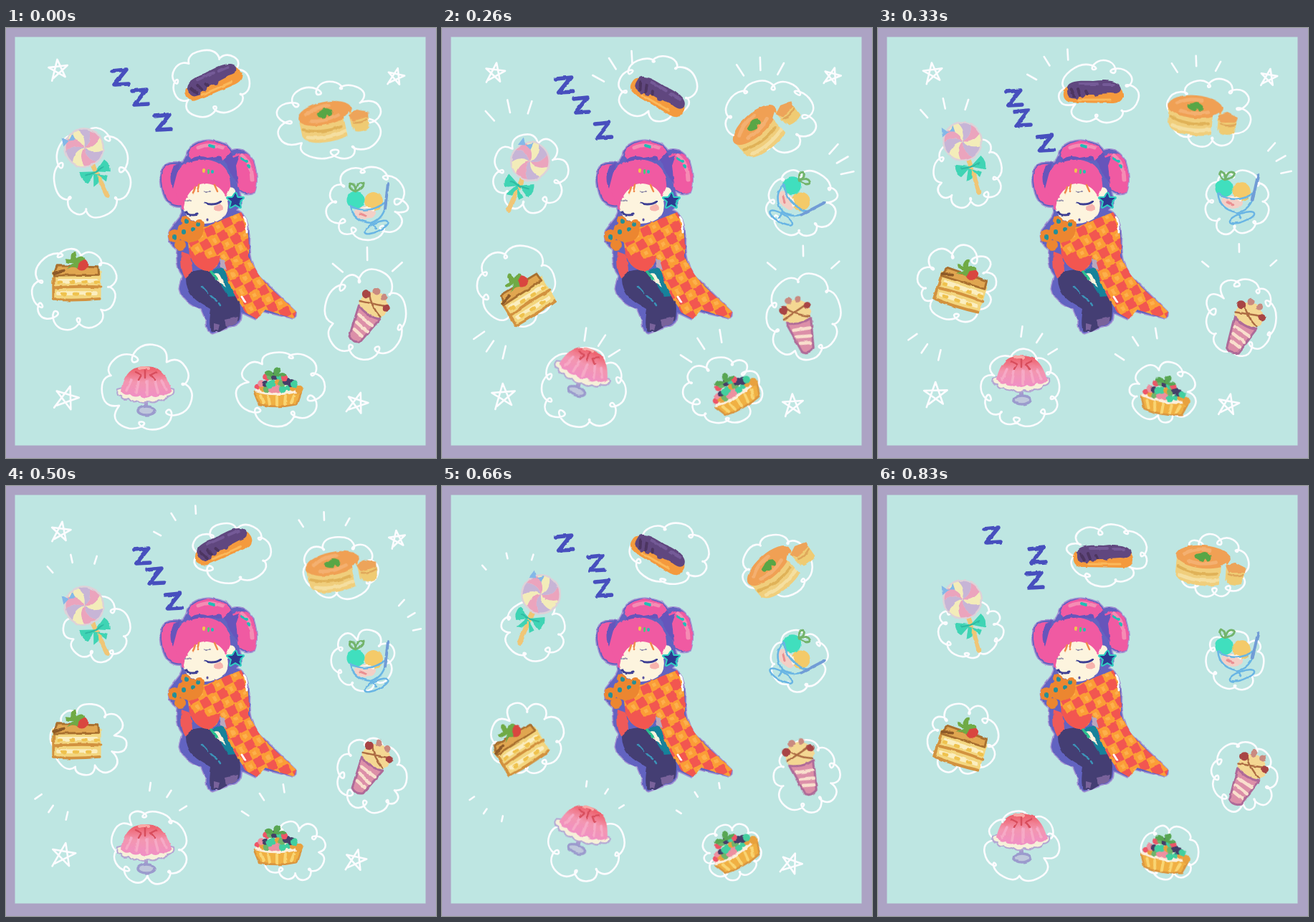
Animation, 600 px wide and 600 px high, one loop 1000 ms. Source, as an HTML page:

```html
<!DOCTYPE html>
<html lang="en">
<head>
<meta charset="utf-8">
<title>Sweet dreams</title>
<style>
html, body { margin: 0; width: 100%; height: 100%; overflow: hidden; background: #aca3c4; }
svg { display: block; width: 100%; height: 100%; }
path, line { stroke-linecap: round; stroke-linejoin: round; }
.line { fill: none; stroke: #fdfcff; stroke-width: 2.6; }
.zzz { fill: none; stroke: #474fbe; stroke-width: 5.5; }
.pose { visibility: hidden; animation: long 1s step-end infinite; }
.pose.brief { animation-name: brief; }
@keyframes long { 0% { visibility: visible } 17%, 100% { visibility: hidden } }
@keyframes brief { 0% { visibility: visible } 16%, 100% { visibility: hidden } }
</style>
</head>
<body>
<svg viewBox="0 0 600 600" fill="none">
<defs>
  <filter id="brush" filterUnits="userSpaceOnUse" x="0" y="0" width="600" height="600" color-interpolation-filters="sRGB">
    <feTurbulence type="fractalNoise" baseFrequency=".08" numOctaves="2" seed="4"/>
    <feDisplacementMap in="SourceGraphic" scale="3.5" xChannelSelector="R" yChannelSelector="G"/>
  </filter>
  <linearGradient id="pink" x2="0" y2="1">
    <stop offset=".1" stop-color="#ee6470"/><stop offset=".5" stop-color="#f396b0"/><stop offset="1" stop-color="#f08fc6"/>
  </linearGradient>
  <pattern id="checks" width="27" height="27" patternUnits="userSpaceOnUse" patternTransform="translate(311 262) rotate(62)">
    <path fill="#fb9d36" d="M0 0H27V27H0Z"/>
    <path fill="#f25650" d="M0 0H13V13H0ZM14 14H27V27H14Z"/>
    <path fill="#fdb04c" d="M17 4H24V9H17ZM4 18H9V23H4Z"/>
  </pattern>

  <g id="eclair">
    <path fill="#f49a3d" d="M-41 0Q-43 15-27 15L28 16Q43 15 42 3 41-9 28-9L-30-9Q-40-8-41 0Z"/>
    <path stroke="#fbb95c" stroke-width="3" d="M-20 11H24"/>
    <path fill="#60477f" d="M-36-4C-37-15-20-16 0-15 20-18 39-15 39-4Q38 4 24 2L8 3Q4 10 0 4L-10 4Q-14 11-18 5L-22 10-29 9Q-37 8-36-4Z"/>
    <path stroke="#4c3560" stroke-width="4" d="M-31-4L-26 6M-21-4l3 8M-10-1l2 4"/>
    <path stroke="#745a97" stroke-width="4" d="M-18-11H6M14-10H29"/>
  </g>

  <g id="pancake">
    <path fill="#f0ce7c" d="M-37-12V13Q-33 27 0 28T36 12V-12Z"/>
    <path stroke="#e0b258" stroke-width="4" d="M-34 4Q-8 16 20 10"/>
    <path stroke="#f5dfa0" stroke-width="5" d="M-30 16Q-4 25 28 17"/>
    <ellipse cy="-12" rx="38" ry="16" fill="#f0a054"/>
    <path stroke="#f4b070" stroke-width="5" d="M-26-15Q-12-24 8-22M-20-5Q0 0 18-6"/>
    <path fill="#58a646" d="M0-6Q-14-8-11-15L-4-17Q2-22 10-15 12-6 6-6L3-10Z"/>
    <path fill="#bee6e2" d="M25-2L33-7 33 24 25 26Z"/>
    <path fill="#eda45a" d="M32-3L45-8 60-2 58 8 38 10Z"/>
    <path fill="#efcb73" d="M34 7L59 5 57 21Q46 25 36 21Z"/>
    <path stroke="#dfa75a" stroke-width="2.5" d="M37 9Q46 12 57 8"/>
  </g>

  <g id="lolly">
    <line y1="20" y2="74" stroke="#f0c676" stroke-width="6.5"/>
    <circle r="28" fill="#ddd2d8"/>
    <g id="swirl" opacity=".85"></g>
    <path fill="#84b8e8" d="M-15-18L-22-27-25-14ZL-6-25-6-15Z"/>
    <path fill="#3fd4b4" d="M0 37L-20 28Q-24 40-17 47ZL18 27Q24 37 18 47ZM-4 38L-12 55-4 53 0 42 7 56 12 50Z"/>
    <path stroke="#2fb9a3" stroke-width="2" d="M-14 36L0 38 13 36"/>
  </g>

  <g id="sundae">
    <ellipse cx="-1" cy="8" rx="15" ry="9" fill="#f3cfc6"/>
    <circle cx="11" cy="-8" r="13" fill="#f4ca69"/>
    <circle cx="-14" cy="-10" r="12.5" fill="#40dfbe"/>
    <path stroke="#73b46c" stroke-width="3" d="M-14-22Q-26-26-21-33-14-32-14-22Q-12-36-3-33-2-26-14-22"/>
    <path stroke="#fff4e4" stroke-width="4" d="M-6 3Q4 0 10 4"/>
    <path stroke="#ea8f92" stroke-width="3" d="M-8 9l8 3"/>
    <path stroke="#69b5e4" stroke-width="2.5" d="M-22-2Q-18 20 8 22 26 16 29-8M-22-2Q4 12 29-8M9 22L14 30"/>
    <ellipse cx="15" cy="28" rx="18" ry="6" transform="rotate(-25 15 28)" stroke="#69b5e4" stroke-width="2.5"/>
    <path stroke="#719cd6" stroke-width="4" d="M31-33L27 2"/>
  </g>

  <g id="crepe">
    <path fill="#f4d792" d="M-20-12Q-22-34 0-37 20-34 20-14L8 0-12 2Z"/>
    <path fill="#dc8fa8" stroke="#ae6a98" stroke-width="3" d="M-18-8Q0 0 17-6L9 35Q0 42-8 36Z"/>
    <path stroke="#f9dfcd" stroke-width="4.5" d="M-11 4L12 7M-9 14L10 18M-7 24L7 27"/>
    <path stroke="#ad6c43" stroke-width="2.5" d="M-20-14L16-26M-14-30Q-4-16 16-9"/>
    <g fill="#a84545"><circle cx="-17" cy="-27" r="6"/><circle cx="17" cy="-24" r="5"/></g>
    <g fill="#c98a80"><circle cx="-7" cy="-37" r="5"/><circle cx="7" cy="-36" r="4.5"/></g>
  </g>

  <g id="tart">
    <path fill="#f0b043" stroke="#d9953f" stroke-width="2.5" d="M-33 6H33L27 23Q0 29-26 23Z"/>
    <path stroke="#f9d573" stroke-width="4" d="M-24 11l4 10M-13 12l2 11M-1 12V24M11 12l-1 11M23 11l-4 10"/>
    <path fill="#fcefdc" d="M-33 6Q-24-12 0-12T33 5Q0 15-33 6Z"/>
    <g id="fruit"></g>
    <path fill="#58a653" d="M-5-17Q-19-15-18-22-10-28-5-18-8-29 2-29 8-23-1-18 8-24 12-18 6-13-5-17Z"/>
  </g>

  <g id="jelly">
    <path stroke="#a59bce" stroke-width="6" d="M0 16V30"/>
    <ellipse cx="1" cy="29" rx="12" ry="6" stroke="#9b9bcd" stroke-width="3.5" fill="#bfc8dc"/>
    <path fill="#f6f0d9" stroke="#b4a6d3" stroke-width="2" d="M-40-1Q-43 8-34 8-32 15-24 12-19 19-11 15-4 21 4 16 12 20 18 14 27 16 30 9 41 8 39-1 0-14-40-1Z"/>
    <path fill="url(#pink)" d="M-35 1Q-30-23-16-30 0-36 16-30 30-22 36 1 30 9 22 6 14 13 8 8 0 14-8 8-16 12-22 6-30 9-35 1Z"/>
    <path stroke="#f6aac6" stroke-width="3.5" d="M-20-14L-27 1M-10-12L-13 5M2-12V7M13-12L17 4M22-13L28 0"/>
    <path stroke="#d84d5c" stroke-width="2.5" d="M-14-25L-6-21-10-14M0-28V-17M14-25L6-21 12-14"/>
    <path stroke="#f9a9a6" stroke-width="4" d="M-9-30Q-2-32 4-30"/>
  </g>

  <g id="cake" transform="scale(.96)">
    <path fill="#f3d67f" d="M-35-12H36V30H-35Z"/>
    <path stroke="#fbeec0" stroke-width="6" d="M-25 3H30M-25 21H28"/>
    <path stroke="#efc24e" stroke-width="5" stroke-dasharray="4 14" d="M-26 5H32M-20 22H30"/>
    <path stroke="#d2923f" stroke-width="4" d="M-32 13Q0 10 36 12M-33 30Q0 32 34 29M-33-2V28"/>
    <path fill="#e0a650" stroke="#a9702f" stroke-width="3" d="M-28-19L32-18 33-6-33-5Z"/>
    <path stroke="#8d5a28" stroke-width="4" d="M-33-8L-18-12"/>
    <circle cx="8" cy="-21" r="9" fill="#d9463f"/>
    <path fill="#70aa45" d="M-4-23Q-18-22-16-29L-8-28Q-8-40-1-40L1-30Q10-36 13-29L4-24 2-15-5-18-14-14Z"/>
  </g>
</defs>

<path fill="#bee6e2" d="M12.5 12.5H585.5V582.5H12.5Z"/>

<g id="girl" filter="url(#brush)">
  <path fill="#6263c1" stroke="#a594d3" stroke-width="1.5" d="M217 198Q222 184 246 187Q252 180 252 173Q260 156 284 156Q308 158 315 170Q334 164 346 186Q354 212 347 230Q336 236 326 229Q334 244 322 254Q336 256 341 290Q338 320 352 344L405 396Q406 406 400 406L358 396 348 407 329 398Q330 412 318 416L288 427Q278 424 279 410L272 393Q246 384 242 364L246 346Q236 334 238 310Q222 298 228 282L242 264Q246 258 245 250Q226 252 219 232Q213 212 217 198Z"/>
  <g fill="#f05aa2">
    <path d="M219 198Q226 187 240 191Q236 216 246 247Q228 250 221 230 216 212 219 198Z"/>
    <path d="M235 214Q240 184 273 183 304 184 312 208L315 238 304 238 248 254Q238 240 235 214Z"/>
    <path d="M254 179Q255 162 282 157 308 160 315 175L302 185Q276 178 258 183Z"/>
    <path d="M315 180Q334 166 344 184 354 212 347 229 336 234 326 226 319 210 315 180Z"/>
  </g>
  <path stroke="#f58cb4" stroke-width="5" d="M268 167Q284 160 302 167M329 177Q343 188 344 212"/>
  <path fill="#6655bb" d="M255 184Q266 176 282 181L300 178 302 185Q276 181 258 187ZM233 192L243 189 238 205 233 224Q226 210 233 192ZM304 184L314 173 318 181 326 178 321 192 324 218 314 204Z"/>
  <path stroke="#20bfb6" stroke-width="4" d="M284 164l7 2M329 182l7 4M288 200v1M338 192l2 2"/>
  <path stroke="#f4c64a" stroke-width="4" d="M276 198v2"/><path stroke="#4fc67a" stroke-width="4" d="M282 199v3"/>
  <path fill="#fdf4de" d="M248 250Q252 222 280 217 300 219 307 236L313 222Q322 224 318 236L309 241Q312 254 304 263 290 276 268 272 250 266 248 250Z"/>
  <path stroke="#f08a4c" stroke-width="2.5" d="M264 222L261 231M270 219L268 228M291 219L295 228"/>
  <path stroke="#9a95ad" stroke-width="2" d="M250 242l8-2M277 228l8 0"/>
  <path stroke="#3d3f93" stroke-width="3" d="M251 257Q258 263 267 260M278 244Q288 249 299 242"/>
  <path stroke="#5a53a0" stroke-width="3" d="M282 267v1"/>
  <ellipse cx="297" cy="251" rx="7" ry="4.5" fill="#f7b3ad"/>
  <path fill="#2b3a90" stroke="#2fd0c2" stroke-width="4" paint-order="stroke" d="M320 231l3 6 8 0-6 5 2 8-7-4-7 4 2-8-6-5 8 0Z"/>

  <path fill="#ef5a59" d="M245 312L256 316Q262 336 259 348L250 349Q242 336 245 312Z"/>
  <path fill="#443e73" d="M251 350Q258 334 286 338L300 352 322 374Q330 388 325 408L298 424 287 424Q282 418 286 392L266 380Q252 370 251 350Z"/>
  <path fill="#16829a" d="M288 340L306 332 322 374 310 375Z"/>
  <path fill="#fcf3dd" d="M289 342L298 344 307 362 294 353Z"/>
  <path stroke="#2cbf8f" stroke-width="4" d="M285 338L295 351"/>
  <path stroke="#3c93b8" stroke-width="2.5" d="M273 360L282 370M286 374l8 7M297 384l2 3"/>
  <path fill="#79629b" d="M306 406l18-4-2 10-14 6zM290 412l8 2-2 8-6 0z"/>

  <path fill="url(#checks)" d="M254 294Q258 278 280 277L300 268 328 257Q340 276 339 318 350 344 368 362L405 396 402 406 362 393 350 406 334 397Q312 366 302 330L299 320Q296 340 280 339 254 334 254 294Z"/>
  <path fill="#f25650" d="M255 313Q276 326 299 317 296 340 280 339 262 336 255 313Z"/>
  <path fill="#b9a7bd" d="M298 322l6 2 4 14-8-4z"/>
  <path stroke="#fff" stroke-width="3" d="M332 264Q337 272 336 285M329 375l5 8"/>

  <g fill="#ec8630">
    <ellipse cx="257" cy="284" rx="18" ry="15"/><circle cx="251" cy="269" r="7"/><circle cx="270" cy="274" r="7"/>
    <circle cx="235" cy="290" r="9"/><circle cx="243" cy="303" r="8"/>
  </g>
  <path stroke="#238f98" stroke-width="6" d="M252 269v1M235 291v1M261 281v0M248 284v1M268 274v0"/>
</g>
<g id="dreams"></g>
</svg>

<script>
const TAU = 2 * Math.PI, starts = [0, 160, 330, 500, 660, 830];

// from, to: cloud centre and size, first and last
// rock: x, y, turn of the three food poses; drift, hop: offsets in the second swing and at its middle
// fan: rays as x, y, radius, aim, spread, first and last pose
const dreams = [
  { id: 'eclair', from: [286,78,113,93], to: [320,96,114,88], rock: [[288,75,-24],[302,94,30],[300,89,0]],
    drift: [14,9], hop: [-14,-9], fan: [268,98,57,238,29,1,3] },
  { id: 'pancake', from: [452,130,150,114], to: [468,112,102,90], rock: [[447,131,-12],[444,144,-42],[442,122,5]],
    drift: [11,-11], hop: [9,-13], fan: [446,105,55,268,31,1,3] },
  { id: 'sundae', from: [504,245,115,106], to: [498,243,84,86], rock: [[502,250,0],[488,237,56],[496,235,6]],
    fan: [505,215,62,330,18,1,3] },
  { id: 'crepe', from: [502,401,118,132], to: [510,405,96,102], rock: [[504,403,30],[500,415,-16],[510,418,27]],
    drift: [4,-9], hop: [0,-13], fan: [505,370,55,269,49,0,2] },
  { id: 'tart', from: [383,502,127,106], to: [406,511,84,80], rock: [[379,502,0],[407,507,-30],[401,513,10]],
    fan: [400,500,71,237,24,1,4] },
  { id: 'jelly', from: [196,503,130,120], to: [200,503,108,103], rock: [[195,505,0],[197,479,20],[200,490,0]],
    fan: [192,484,57,303,25,1,4] },
  { id: 'cake', from: [95,364,124,118], to: [119,353,104,102], rock: [[98,350,0],[115,374,-32],[117,360,18]],
    hop: [-9,-11], fan: [100,395,59,124,21,1,4] },
  { id: 'lolly', from: [120,204,112,130], to: [129,200,92,86], rock: [[109,167,-26],[123,186,24],[118,158,-18]],
    hop: [15,-35], fan: [105,165,57,258,30,1,4] }
];
// x, y, radius, last pose
const stars = [[75,60,14,3], [544,70,12,3], [82,514,17,3], [488,526,15,4]];
// x, y, sway, drift
const snores = [[176,85,17,0], [187,113,0,7], [227,148,8,0]];

const random = seed => () => (seed = seed * 16807 % 2147483647) / 2147483647;
const stroke = (d, name = 'line') => `<path class="${name}" d="${d}"/>`;
const point = (x, y) => x.toFixed(1) + ' ' + y.toFixed(1);
const polar = (x, y, r, deg) => point(x + r * Math.cos(deg * TAU / 360), y + r * Math.sin(deg * TAU / 360));

// Scalloped outline whose dips curl back into small loops.
function cloud({ from, to }, k, rand) {
  const ease = 1 - (1 - k / 5) ** 2;
  const [cx, cy, w, h] = from.map((v, i) => v + (to[i] - v) * ease);
  const n = 7 + Math.floor(rand() * 3), step = TAU / n, phase = rand() * step;
  const at = (a, r, slide = 0) => point(
    cx + w / 2 * (r * Math.cos(a) - slide * Math.sin(a)),
    cy + h / 2 * (r * Math.sin(a) + slide * Math.cos(a)));
  const dips = Array.from({ length: n }, (_, i) => ({
    a: phase + (i + rand() * .5 - .25) * step, r: .65 + rand() * .17, curl: rand() * .24 - .02
  }));
  dips.push({ ...dips[0], a: dips[0].a + TAU });
  let d = 'M' + at(dips[0].a, dips[0].r);
  for (let i = 0; i < n; i++) {
    const p = dips[i], q = dips[i + 1];
    const mid = (p.a + q.a) / 2, top = .93 + rand() * .1, lean = (q.a - p.a) * .42;
    d += `C${at(p.a, p.r, -p.curl)} ${at(mid, top, -lean)} ${at(mid, top)}`
       + `C${at(mid, top, lean)} ${at(q.a, q.r, q.curl)} ${at(q.a, q.r)}`;
  }
  return stroke(d);
}

// Three rays that fly outwards and shrink.
function rays([x, y, r, aim, spread, first, last], k) {
  if (k < first || k > last) return '';
  const age = k - first, mid = r + 4 * age, half = 9 - 1.7 * age;
  return stroke([-1, 0, 1].map(i => {
    const a = aim + i * spread;
    return `M${polar(x, y, mid - half, a)}L${polar(x, y, mid + half, a)}`;
  }).join(''));
}

function star([x, y, r, last], k, rand) {
  if (k > last) return '';
  const dx = rand() * 8 - 4, dy = rand() * 8 - 4, turn = 126 + rand() * 28 - 8;
  const tips = [0, 1, 2, 3, 4, 5].map(i => polar(x + dx, y + dy, i ? r : r * 1.3, turn + i * 144));
  return stroke('M' + tips.join('L'));
}

function food({ id, rock, drift = [0, 0], hop = [0, 0] }, k) {
  const [x, y, turn] = rock[k % 3], second = k > 2, middle = k === 4;
  const dx = second * drift[0] + middle * hop[0], dy = second * drift[1] + middle * hop[1];
  return `<use href="#${id}" transform="translate(${x + dx} ${y + dy}) rotate(${turn})"/>`;
}

function snore([x, y, sway, drift], k) {
  const wave = Math.cos(TAU * k / 5);
  return stroke(`M${point(x + drift * k - sway * wave - 11, y - 16 * wave - 9)}l20-2-17 21 20-1`, 'zzz');
}

function pose(k) {
  const rand = random(4999 + 7919 * k);
  const all = (list, draw) => list.map(o => draw(o, k, rand)).join('');
  return `<g class="pose${k % 3 ? '' : ' brief'}" style="animation-delay:${starts[k] - 1000}ms">`
    + all(dreams, cloud) + all(dreams, o => rays(o.fan, k)) + all(stars, star)
    + `<g filter="url(#brush)">${all(dreams, food)}${all(snores, snore)}</g></g>`;
}

const fill = (id, html) => document.getElementById(id).innerHTML = html;
const candy = ['#ee9cb9', '#f7f1b4', '#c4b1d6'];
const berries = ['#ee5567', '#43cf9f', '#ec90a0', '#453f68', '#6fb46a', '#e8a13e'];
const toss = random(90210);
fill('swirl', Array.from({ length: 9 }, (_, i) =>
  `<path d="M0 0Q14-2 18-18A25.5 25.5 0 0 1 25.4-2.2Q12 7.5 0 0Z" fill="${candy[i % 3]}" transform="rotate(${i * 40})"/>`).join(''));
fill('fruit', Array.from({ length: 25 }, (_, i) => {
  const row = Math.floor(i / 9), x = (i % 9 - 4) * (7.2 - 1.6 * row) + toss() * 3 - 1.5;
  return `<circle cx="${x}" cy="${1 - row * 8 + toss() * 4 - 2}" r="${4 + toss() * 1.8}" fill="${berries[i * 5 % 6 ^ (toss() < .3)]}"/>`;
}).join(''));
fill('dreams', starts.map((_, k) => pose(k)).join(''));
</script>
</body>
</html>
```
